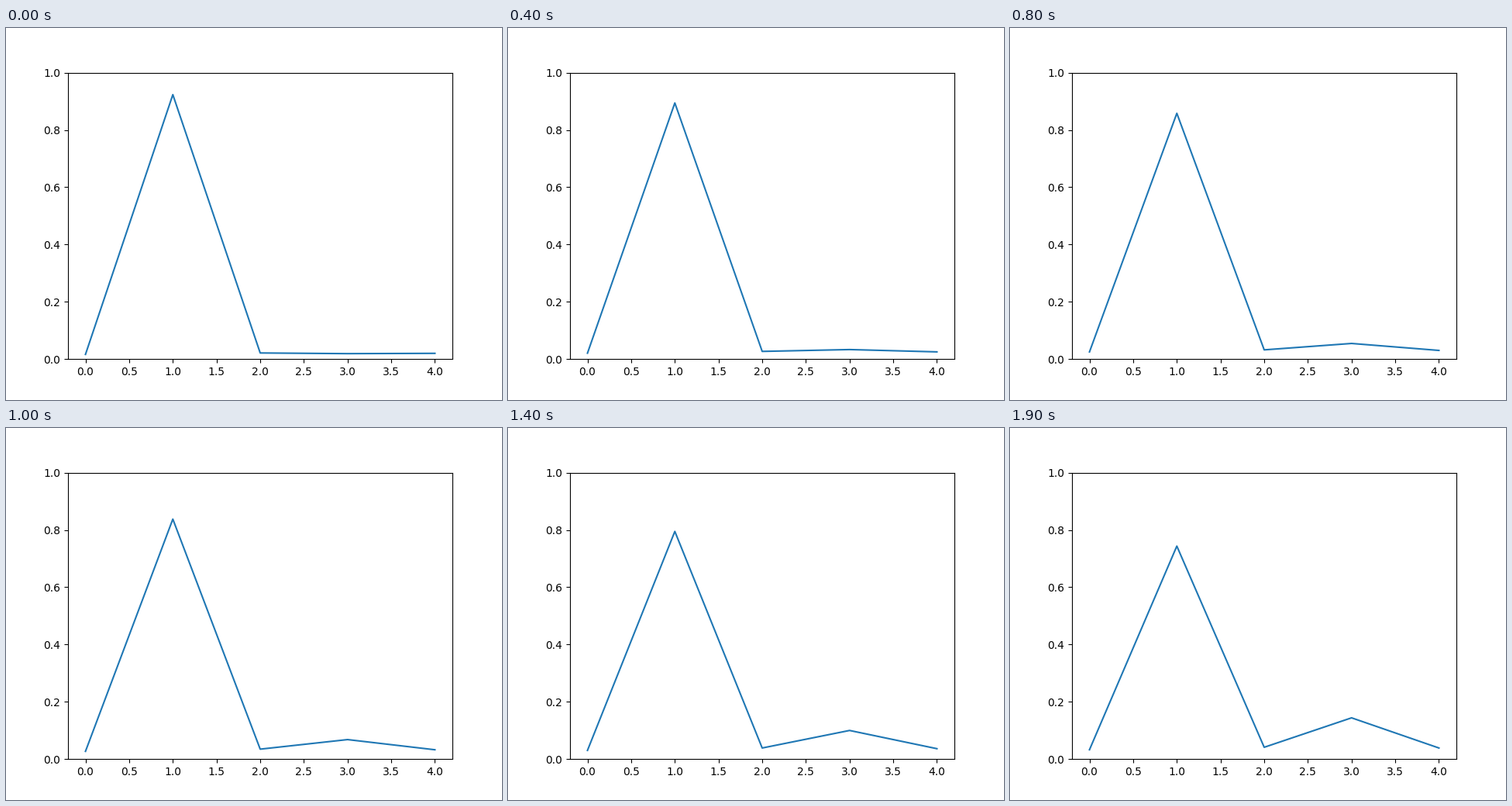
A matplotlib script for the animation above (2 s loop, 640x480 px).

```python
import numpy as np
import matplotlib.pyplot as plt
from matplotlib.animation import FuncAnimation

FRAMES = 20


def cubic(t, a, b, c, d):
    return a + t * (b + t * (c + t * d))


def softmax(z):
    e = np.exp(z - z.max())
    return e / e.sum()


def probs(t):
    # Logits relative to class 1: class 3 catches up, the rest rise together.
    rest = cubic(t, -3.766, 0.0682, -0.00083, -1.8e-5)
    rival = cubic(t, -3.883, 0.15356, -0.00136, -2.7e-5)
    return softmax(np.array([
        rest - 0.268 + 0.0018 * t,
        0,
        rest,
        rival,
        rest - 0.063,
    ]))


fig, ax = plt.subplots(figsize=(6.4, 4.8), dpi=100)
line, = ax.plot(np.arange(5), probs(0))
ax.set_ylim(0, 1)


def update(i):
    line.set_ydata(probs(i))
    return line,


anim = FuncAnimation(fig, update, frames=FRAMES, interval=100, repeat=True)
plt.show()
```
